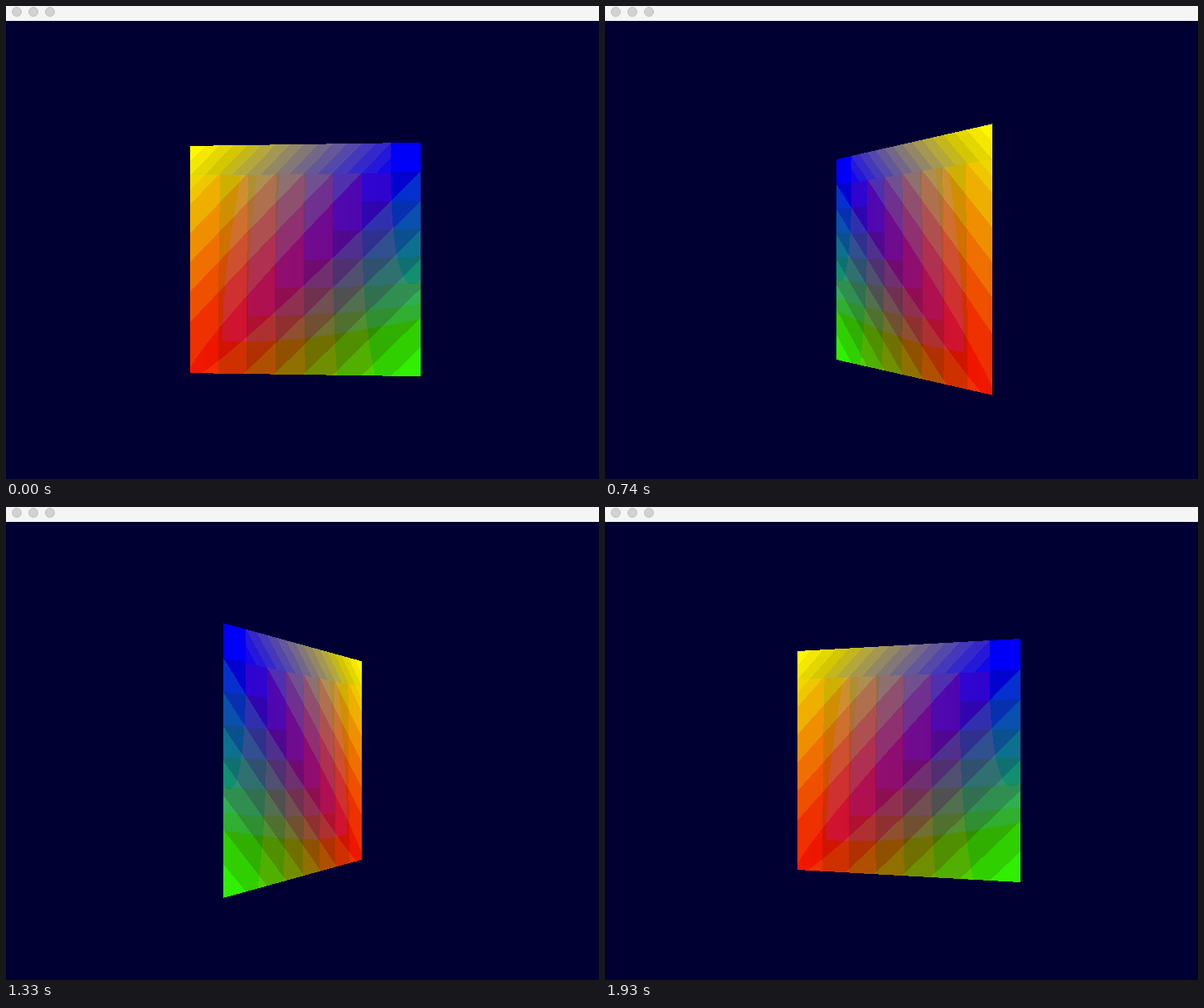
An HTML page with a canvas for the animation above (2030 ms loop, 715x571 px).

```html
<!DOCTYPE html>
<html lang="en">
<head>
<meta charset="utf-8">
<title>Rotating colour square</title>
<style>
  html, body { margin: 0; width: 100%; height: 100%; overflow: hidden; background: #000033; }
  canvas { position: absolute; left: 0; top: 0; display: block; }
  .bar { position: absolute; left: 0; top: 0; width: 715px; height: 18px; background: #f5f5f5; }
  .bar i {
    position: absolute; top: 1px; width: 12px; height: 12px; box-sizing: border-box;
    border-radius: 50%; background: #d2d2d2; border: 1px solid #c2c2c2;
  }
</style>
</head>
<body>
<canvas id="view" width="715" height="571"></canvas>
<div class="bar"><i style="left:7px"></i><i style="left:27px"></i><i style="left:47px"></i></div>
<script>
const LOOP = 2030;
// [start in ms, angle in degrees]
const POSES = [
  [0, -4.2], [150, 25.2], [300, 48.8], [450, 78.4], [590, 105], [740, 131.3], [890, 154.9],
  [1040, 184], [1180, 210.8], [1330, 234.1], [1480, 262], [1630, 290.1], [1780, 316.6], [1930, 344.4]
];
const CX = 359, CY = 306, HALF = 139.1, DEPTH = 0.2, GAMMA = 2.2;
const X0 = 200, Y0 = 120, W = 320, H = 372;

const ctx = document.getElementById('view').getContext('2d');
const image = ctx.createImageData(W, H);
const toLinear = v => Math.pow(v, GAMMA);
const toScreen = v => Math.pow(Math.min(1, Math.max(0, v)), 1 / GAMMA);
const bin = (v, n) => Math.min(n - 1, Math.floor(v * n));
const level = (v, n) => (bin(v, n) + 0.5) / n;

// Banded colour at p (across) and q (down), both from 0 to 1
function shade(p, q) {
  const upper = p + q < 1;
  const r = toLinear(1 - p);
  const g = toLinear(Math.abs(1 - p - q));
  const b = toLinear(upper ? p : 1 - q);
  const red = toScreen(r + 0.033 * g);
  const green = toScreen(g + 0.01 * r);
  const blue = toScreen(b - 0.065 * g - 0.005 * r);

  if (blue > 0.875 && green < 0.125) return [0, 0, 250];
  if (upper && q < 0.13) {
    const y = level(green, 16), x = Math.min(1, y + 0.05);
    return [x * 255, y * 255, 255 * toScreen(toLinear(1 - x) - 0.065 * toLinear(y))];
  }
  const R = bin(red, 8) ? level(red, 8) * 255 : 32 * green;
  const G = bin(green, 8) ? level(green, upper && green > 0.75 ? 16 : 8) * 255 : 24 * red;
  const B = bin(blue, 8) ? level(blue, 8) * 255 : 0;
  return [R, G, B];
}

function draw(angle) {
  const a = angle * Math.PI / 180, c = Math.cos(a), s = Math.sin(a);
  const data = image.data;
  for (let x = 0; x < W; x++) {
    const dx = X0 + x + 0.5 - CX;
    const u = dx / (HALF * c - DEPTH * s * dx);
    const scale = (1 + DEPTH * u * s) / HALF;
    for (let y = 0; y < H; y++) {
      const v = (Y0 + y + 0.5 - CY) * scale;
      const inside = Math.abs(u) <= 1 && Math.abs(v) <= 1;
      const [r, g, b] = inside ? shade((u + 1) / 2, (v + 1) / 2) : [0, 0, 51];
      const i = (y * W + x) * 4;
      data[i] = r;
      data[i + 1] = g;
      data[i + 2] = b;
      data[i + 3] = 255;
    }
  }
  ctx.putImageData(image, X0, Y0);
}

const start = performance.now();
let shown = -1;
function tick() {
  const t = Math.max(0, performance.now() - start) % LOOP;
  const pose = POSES.filter(([from]) => from <= t).length - 1;
  if (pose !== shown) {
    draw(POSES[pose][1]);
    shown = pose;
  }
  requestAnimationFrame(tick);
}
tick();
</script>
</body>
</html>
```
